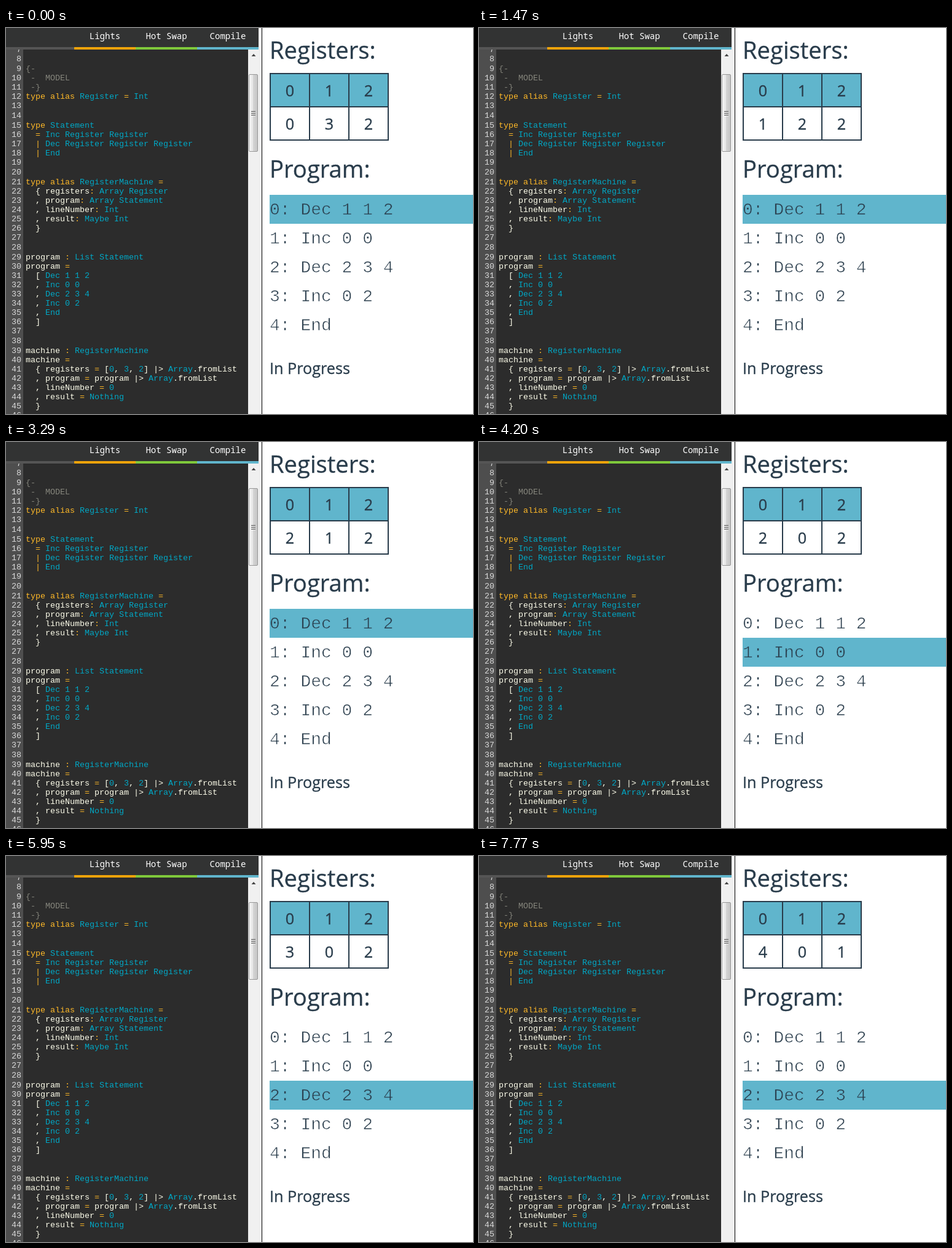
An HTML page for the animation above (8000 ms loop, 760 by 627 pixels).

```html
<!DOCTYPE html>
<html lang="en">
<head>
<meta charset="utf-8">
<title>Register machine</title>
<style>
html, body { margin: 0; width: 100%; height: 100%; overflow: hidden; background: #fff; }
svg { display: block; width: 760px; height: 627px; }
text { white-space: pre; }
.code { font: 13.333px "Liberation Mono", monospace; fill: #ffffec; }
.num { fill: #dadada; text-anchor: end; }
.key { fill: #ffb928; }
.type { fill: #00a8c6; }
.note { fill: #85857c; }
.tab { font: 14px "Noto Sans Mono", monospace; fill: #fff; text-anchor: middle; }
.head, .body, .cell { font-family: "Open Sans", sans-serif; fill: #293c4b; stroke: #293c4b; stroke-width: .35; }
.head { font-size: 38.2px; }
.body, .cell { font-size: 25.2px; }
.cell { text-anchor: middle; }
.row { font: 28px "Liberation Mono", monospace; fill: #293c4b; stroke-width: .7; }
</style>
</head>
<body>
<svg id="stage" viewBox="0 0 760 627">
  <defs>
    <linearGradient id="thumb">
      <stop offset="0" stop-color="#f5f5f5"/>
      <stop offset=".45" stop-color="#e6e6e6"/>
      <stop offset=".5" stop-color="#d4d4d4"/>
      <stop offset="1" stop-color="#c4c4c4"/>
    </linearGradient>
    <clipPath id="pane"><rect y="35" width="394" height="592"/></clipPath>
  </defs>
</svg>
<script>
const BLUE = '#60b5cc', INK = '#293c4b';
const LOOP = 8000;
const STEPS = [630, 1470, 2380, 3290, 4200, 5110, 5950, 6860, 7770];
const START = [0, 3, 2];
const PROGRAM = ['Dec 1 1 2', 'Inc 0 0', 'Dec 2 3 4', 'Inc 0 2', 'End'];
const FIRST_LINE = 7;
const SOURCE = `

{-
 -  MODEL
 -}
type alias Register = Int


type Statement
  = Inc Register Register
  | Dec Register Register Register
  | End


type alias RegisterMachine =
  { registers: Array Register
  , program: Array Statement
  , lineNumber: Int
  , result: Maybe Int
  }


program : List Statement
program =
  [ Dec 1 1 2
  , Inc 0 0
  , Dec 2 3 4
  , Inc 0 2
  , End
  ]


machine : RegisterMachine
machine =
  { registers = [0, 3, 2] |> Array.fromList
  , program = program |> Array.fromList
  , lineNumber = 0
  , result = Nothing
  }
`.split('\n');

const stage = document.getElementById('stage');

function add(tag, attrs, parent = stage) {
  const el = document.createElementNS('http://www.w3.org/2000/svg', tag);
  for (const k in attrs) el.setAttribute(k, attrs[k]);
  parent.appendChild(el);
  return el;
}
const rect = (x, y, width, height, fill, parent) => add('rect', { x, y, width, height, fill }, parent);
function text(cls, x, y, str, parent) {
  const el = add('text', { class: cls, x, y }, parent);
  el.textContent = str;
  return el;
}

function codeLine(line, y, parent) {
  const el = text('code', 32, y, '', parent);
  const span = (str, cls) => { add('tspan', { class: cls }, el).textContent = str; };
  if (/^( -|\{-)/.test(line)) return span(line, 'note');
  const tokens = line.match(/\|>|\b(?:type|alias)\b|[=:|]|[A-Z]\w*|\d+|[a-z]\w*|\s+|./g) || [];
  for (const t of tokens) {
    span(t, /^(type|alias|[=:|])$/.test(t) ? 'key' : /^[A-Z\d]/.test(t) ? 'type' : 'plain');
  }
}

function drawEditor() {
  rect(0, 0, 411, 31, '#323333');
  rect(0, 31, 111, 4, '#555');
  [['Lights', '#f0a30a'], ['Hot Swap', '#7fc93b'], ['Compile', BLUE]].forEach(([name, color], i) => {
    rect(111 + i * 100, 31, 100, 4, color);
    text('tab', 161 + i * 100, 18, name);
  });

  const pane = add('g', { 'clip-path': 'url(#pane)' });
  rect(0, 35, 394, 592, '#2c2c2c', pane);
  rect(0, 35, 28, 592, '#4e4e4e', pane);
  let y = 39;
  SOURCE.forEach((line, i) => {
    text('code num', 25, y, FIRST_LINE + i, pane);
    codeLine(line, y, pane);
    // blank lines are one pixel taller
    y += line || i === 0 ? 15 : 16;
  });
}

function drawScrollbar() {
  rect(394, 35, 17, 592, '#f0f0f0');
  add('path', { d: 'M399.5 46h7l-3.5-4z', fill: '#444' });
  add('rect', { x: 395.5, y: 75.5, width: 14, height: 125, rx: 1.5, fill: 'url(#thumb)', stroke: '#979797' });
  for (let i = 0; i < 3; i++) {
    rect(399, 135 + i * 3, 7, 1, '#444');
    rect(399, 136 + i * 3, 7, 1, '#f4f4f4');
  }
  rect(411, 0, 5, 627, '#f0f0f0');
  rect(416, 0, 1, 627, '#000');
}

drawEditor();
drawScrollbar();

text('head', 429, 50, 'Registers:');
rect(430, 74, 192, 54, BLUE);
add('path', { d: 'M430 74h192v108h-192zM430 128h192M494 74v108M558 74v108', fill: 'none', stroke: INK, 'stroke-width': 2 });
const cells = START.map((_, i) => {
  text('cell', 462 + i * 64, 111, i);
  return text('cell', 462 + i * 64, 165, '');
});

text('head', 429, 243, 'Program:');
const bar = rect(429, 271, 331, 47, BLUE);
// an outline in the background colour keeps the strokes thin
const rows = PROGRAM.map((op, i) => text('row', 429, 303 + i * 47, i + ': ' + op));
text('body', 429, 562, 'In Progress');

function run(count) {
  const regs = START.slice();
  let line = 0;
  while (count-- > 0) {
    const [op, ...args] = PROGRAM[line].split(' ');
    const [r, next, jump] = args.map(Number);
    if (op === 'Inc') {
      regs[r]++;
      line = next;
    } else if (op === 'Dec') {
      if (regs[r] > 0) {
        regs[r]--;
        line = next;
      } else {
        line = jump;
      }
    }
  }
  return { regs, line };
}

let shown = -1;
function draw(ms) {
  const count = STEPS.filter(t => t <= ms).length;
  if (count === shown) return;
  shown = count;
  const { regs, line } = run(count);
  cells.forEach((cell, i) => { cell.textContent = regs[i]; });
  bar.setAttribute('y', 271 + line * 47);
  rows.forEach((row, i) => row.setAttribute('stroke', i === line ? BLUE : '#fff'));
}

const origin = performance.now();
function tick() {
  draw((performance.now() - origin) % LOOP);
  requestAnimationFrame(tick);
}
tick();
</script>
</body>
</html>
```
